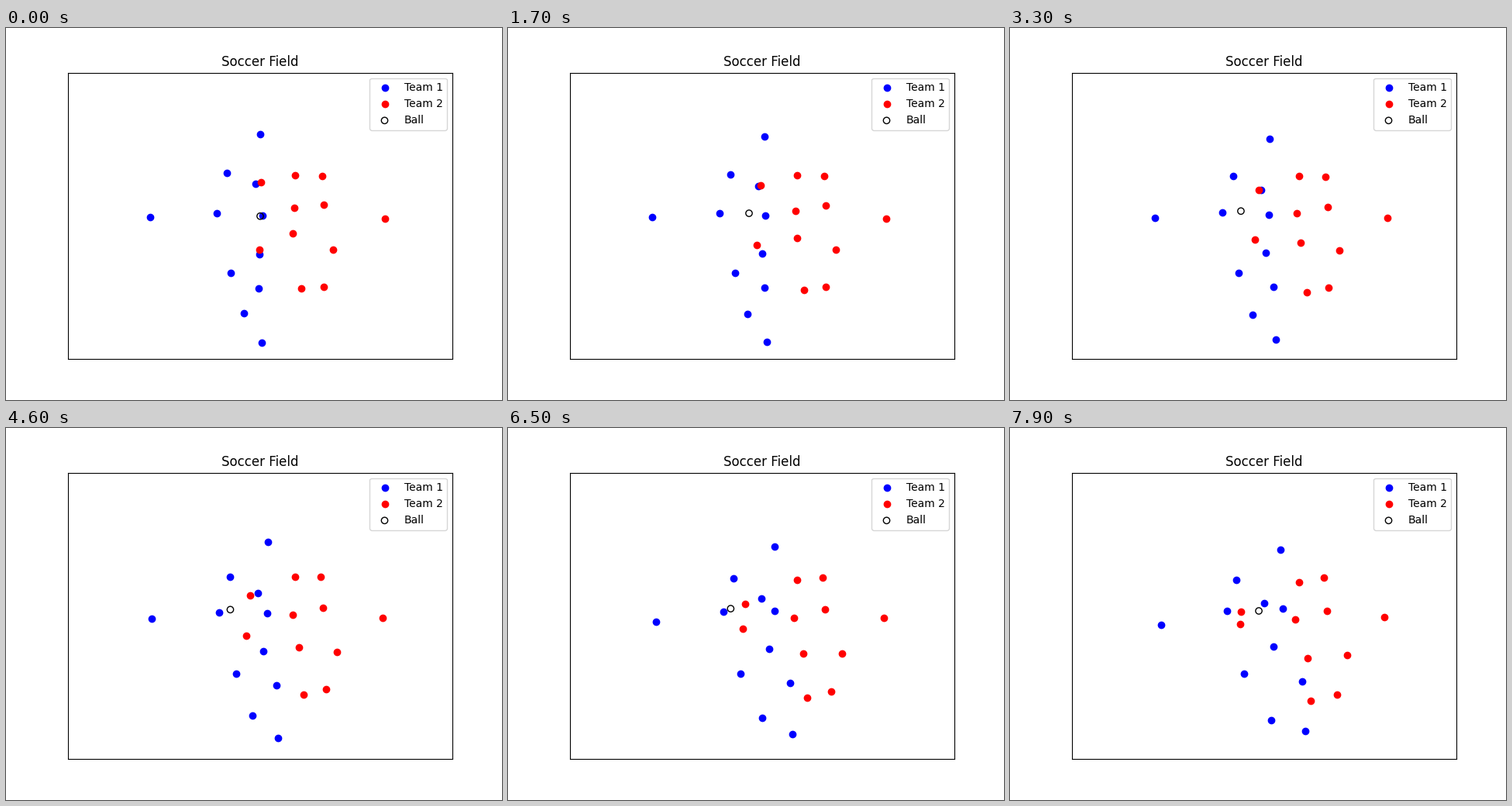
Animation, 640 px wide and 480 px high, one loop 8000 ms. Source, as a matplotlib script:

```python
import numpy as np
import matplotlib.pyplot as plt
from matplotlib.animation import FuncAnimation

FRAMES, STEP = 80, 100  # count, ms
END = (FRAMES - 1) * STEP / 1000  # s

# Players run from a start point by a shift, in stage pixels;
# pace 1 is an even run, a higher pace starts slower and speeds up.
# x, y, dx, dy, pace
BLUE = [
    (328, 137, 21, 20, 1.3),
    (285, 187, 7, 9, 1.0),
    (322, 201, 6, 25, 1.3),
    (186, 244, 9, 10, 3.0),
    (272, 239, 8, -3, 1.8),
    (331, 242, 21, -9, 2.3),
    (327, 292, 13, -10, 1.6),
    (290, 316, 12, 1, 1.0),
    (326, 336, 51, -9, 1.5),
    (307, 368, 30, 9, 1.8),
    (330, 406, 51, -15, 1.6),
]
RED = [
    (329, 199, -31, 38, 1.5),
    (373, 190, 0, 9, 2.5),
    (408, 191, -3, 2, 1.2),
    (372, 232, -4, 15, 0.9),
    (410, 228, -1, 8, 1.1),
    (489, 246, -6, -2, 1.5),
    (370, 265, 14, 32, 1.1),
    (327, 286, -30, -33, 1.1),
    (422, 286, 13, 7, 1.8),
    (381, 336, 7, 16, 1.3),
    (410, 334, 12, 10, 2.5),
]

# The ball rolls left, slowed by drag, until it is kicked back.
DRAG = 0.051
KICK = 6.27  # s
BALL_START = np.array([328, 242.8])
PASS_SPEED = np.array([-10.95, -2.4])
KICK_SPEED = np.array([26.6, 2.3])


def team_path(players):
    x, y, dx, dy, pace = np.array(players, float).T

    def at(t):
        p = (t / END) ** pace
        return np.column_stack([x + dx * p, y + dy * p])

    return at


def roll(start, speed, t):
    return start + speed * (t - DRAG * t * t)


def ball_path(t):
    pos = roll(BALL_START, PASS_SPEED, min(t, KICK))
    return [roll(pos, KICK_SPEED, max(t - KICK, 0))]


fig, ax = plt.subplots(figsize=(6.4, 4.8), dpi=100)
ax.set(xlim=(80, 576), ylim=(427.2, 57.6), xticks=[], yticks=[])
ax.set_title("Soccer Field")

movers = [
    (ax.scatter([], [], color="blue", label="Team 1"), team_path(BLUE)),
    (ax.scatter([], [], color="red", label="Team 2"), team_path(RED)),
    (ax.scatter([], [], facecolors="none", edgecolors="black", label="Ball"),
     ball_path),
]
ax.legend(loc="upper right")


def update(frame):
    t = frame * STEP / 1000
    for dots, path in movers:
        dots.set_offsets(path(t))
    return [dots for dots, _ in movers]


anim = FuncAnimation(fig, update, frames=FRAMES, interval=STEP,
                     repeat=True, repeat_delay=0)
plt.show()
```
